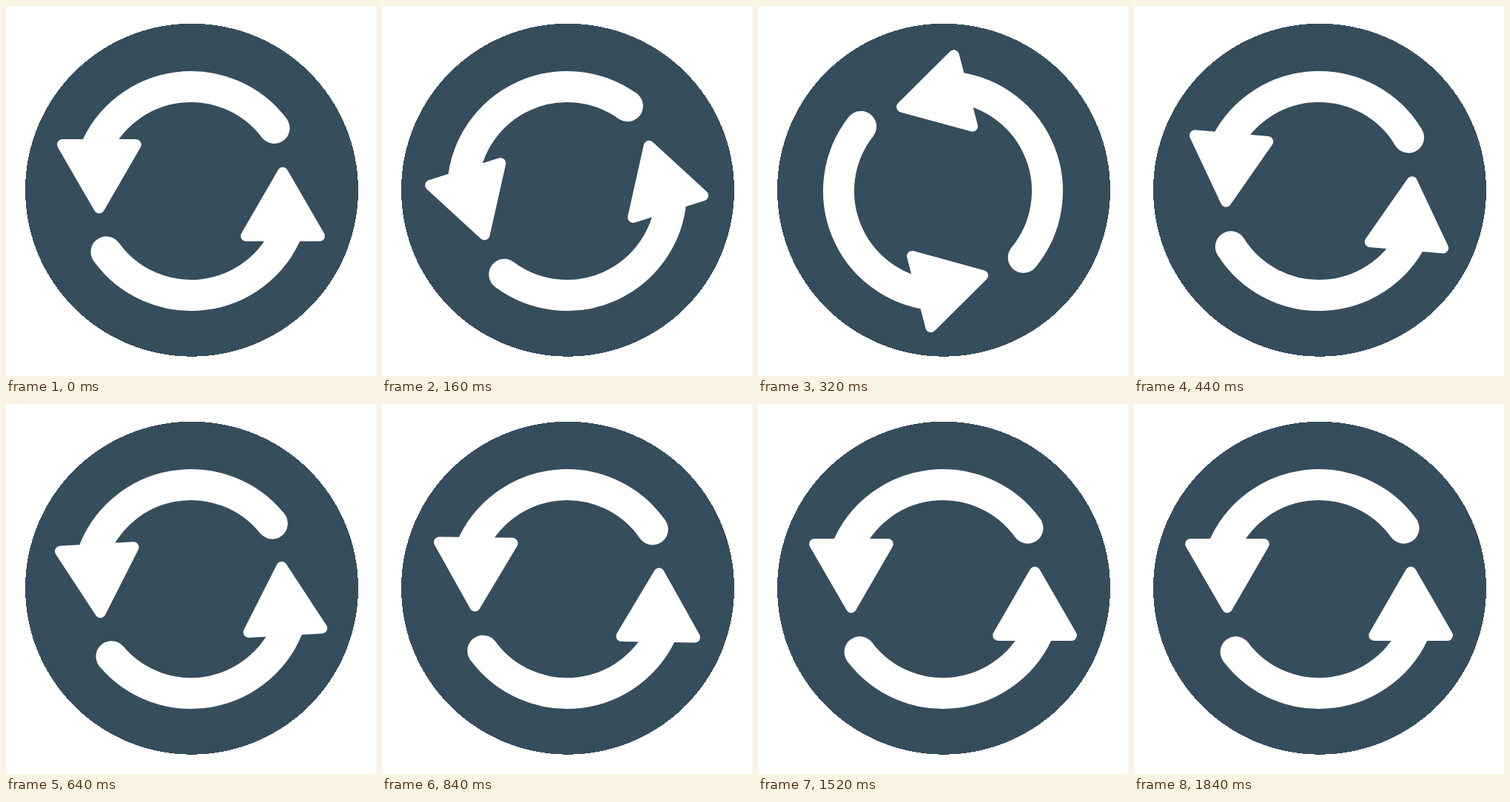
These frames come from a looping animation (500 by 500 pixels, 1880 ms). An HTML page:

```html
<!DOCTYPE html>
<html lang="en">
<head>
<meta charset="utf-8">
<title>Refresh arrows</title>
<style>
  html, body { margin: 0; height: 100%; overflow: hidden; background: #fff; }
  svg { display: block; width: 100%; height: 100%; }
  .arc { fill: none; stroke: #fff; stroke-width: 42; }
  .head { fill: #fff; stroke: #fff; stroke-width: 14.5; stroke-linejoin: round; }
</style>
</head>
<body>
<svg viewBox="0 0 500 500">
  <circle cx="251" cy="248.7" r="225" fill="#364d5c" shape-rendering="crispEdges"/>
  <g id="arrows">
    <path class="arc" id="top"/>
    <path class="arc" id="bottom"/>
    <circle id="topCap" r="21" fill="#fff"/>
    <circle id="bottomCap" r="21" fill="#fff"/>
    <path class="head" d="M76.3 187.3H175.5L125.9 273Z"/>
    <path class="head" d="M324.4 310.8H423.6L374 225.1Z"/>
  </g>
</svg>
<script>
const LOOP = 1880, STEP = 40, TURN = 180, RADIUS = 141;
const LAND = 460;                              // ms until the turn first reaches its end
const SWING = 17.5, FREQ = 2, DECAY = 8;       // overshoot: degrees, Hz, 1/s
const get = id => document.getElementById(id);

function point(deg) {
  const a = deg * Math.PI / 180;
  return [250 + RADIUS * Math.cos(a), 250 + RADIUS * Math.sin(a)];
}

// Counter-clockwise arc with a round cap at its start
function drawArc(name, from, to) {
  const [x, y] = point(from);
  get(name).setAttribute('d', `M${x} ${y}A${RADIUS} ${RADIUS} 0 0 0 ${point(to)}`);
  get(name + 'Cap').setAttribute('cx', x);
  get(name + 'Cap').setAttribute('cy', y);
}
drawArc('top', -37.1, -158);
drawArc('bottom', 144.3, 22);

const bezier = (s, a, b) => 3 * (1 - s) ** 2 * s * a + 3 * (1 - s) * s * s * b + s ** 3;

function ease(u) {
  let lo = 0, hi = 1;
  for (let i = 0; i < 30; i++) {
    const mid = (lo + hi) / 2;
    if (bezier(mid, 0.681, 0.64) < u) lo = mid; else hi = mid;
  }
  return bezier(lo, 0, 0.813);
}

function angle(t) {
  if (t < LAND) return TURN * ease(t / LAND);
  const s = (t - LAND) / 1000;
  return TURN + SWING * Math.sin(2 * Math.PI * FREQ * s) * Math.exp(-DECAY * s);
}

function draw(now) {
  const t = Math.floor((now + 1) / STEP) * STEP % LOOP;
  get('arrows').setAttribute('transform', `rotate(${-angle(t)} 250 250)`);
  requestAnimationFrame(draw);
}
draw(0);
</script>
</body>
</html>
```
